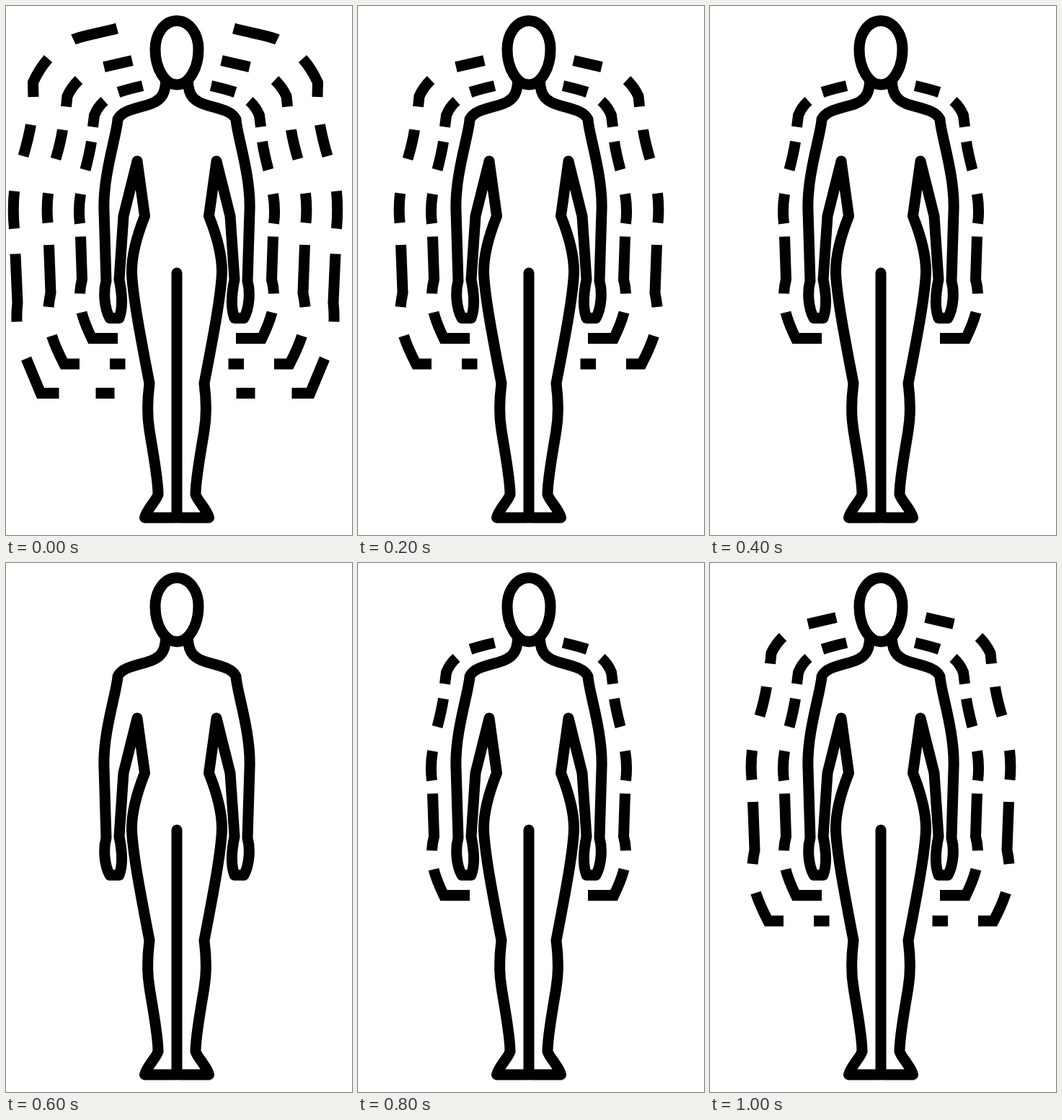
These frames come from a looping animation (480 by 733 pixels, 1200 ms). An HTML page:

```html
<!DOCTYPE html>
<html lang="en">
<head>
<meta charset="utf-8">
<title>Body aura</title>
<style>
  html, body { margin: 0; width: 100%; height: 100%; overflow: hidden; background: #fff; }
  svg { display: block; width: 100%; height: 100%; }
</style>
</head>
<body>
<svg viewBox="0 0 480 733" fill="none" stroke="#000" stroke-width="15">
  <g id="body" stroke-linecap="round" stroke-linejoin="round">
    <path d="M237 20.5C254 20.5 267 38 267 60C267 86 254 109 237 109S207 86 207 60C207 38 220 20.5 237 20.5Z"/>
    <path d="M237 370V709"/>
  </g>
  <g id="aura"></g>
</svg>
<script>
const STEP = 200;
const LEVELS = 3;

// Left half of the figure, from neck to foot.
const side = `M221.5 105C221 125 212 133 195 137.5S160 146 155 157
  C154 178 134 235 136 284L139 381C135 395 136 418 144 432.5H157
  C162 419 161 398 157 379L163 291L182 215L192.5 291
  C179 325 174 348 174.5 370C176 405 188 465 199 523
  C196 546 196 570 199 588C204 620 211 655 211 677
  C208 686 195 698 192.5 709H233.5`;

// Left halves of the rings, inner to outer, each with its mirror axis.
const rings = [
  { axis: 237, d: `M156 119.5Q170 115 189.5 110.5
    M136.5 131.5Q127 140 122.5 151.5L120.5 167.5
    M118.5 188Q116 204 110 227
    M103.5 260.5Q100 281 102.5 301.5
    M103.5 319.5L105.5 379Q103 388 102.5 398.5
    M105 424.5Q109 440 119 460.5H155` },
  { axis: 237, d: `M136 84.5L175 75.5
    M101 102.5Q91 112 85 125L83.5 139.5
    M78.5 171.5Q76 188 69 212
    M58.5 259.5Q56 280 58 300.5
    M59.5 331L62 397.5Q60 407 59 417
    M63.5 457Q69 474 80.5 496H102
    M144 496H165.5` },
  { axis: 235, d: `M93.5 46.5C104 41.5 130 37.5 154 31
    M58.5 73Q46 87 37.5 106L38 126
    M34.5 164.5Q31 184 24 208
    M11.5 256.5Q9 283 11.5 308.5
    M13 343.5L16 411Q14.5 424 15 437.5
    M28 488.5L48 536.5H73.5
    M124.5 536.5H150.5` }
];

function add(parent, tag, attrs) {
  const node = document.createElementNS("http://www.w3.org/2000/svg", tag);
  for (const key in attrs) node.setAttribute(key, attrs[key]);
  return parent.appendChild(node);
}

function addPair(parent, d, axis) {
  add(parent, "path", { d });
  add(parent, "path", { d, transform: `matrix(-1 0 0 1 ${2 * axis} 0)` });
}

addPair(document.getElementById("body"), side, 237);

const aura = document.getElementById("aura");
const groups = rings.map(({ d, axis }) => {
  const group = add(aura, "g", {});
  addPair(group, d, axis);
  return group;
});

// Rings vanish one by one from the outside, then return.
function draw(time) {
  const step = Math.floor(time / STEP) % (2 * LEVELS);
  const shown = Math.abs(LEVELS - step);
  groups.forEach((group, i) => {
    group.setAttribute("visibility", i < shown ? "visible" : "hidden");
  });
}

const start = performance.now();
function tick() {
  draw(performance.now() - start);
  requestAnimationFrame(tick);
}
tick();
</script>
</body>
</html>
```
